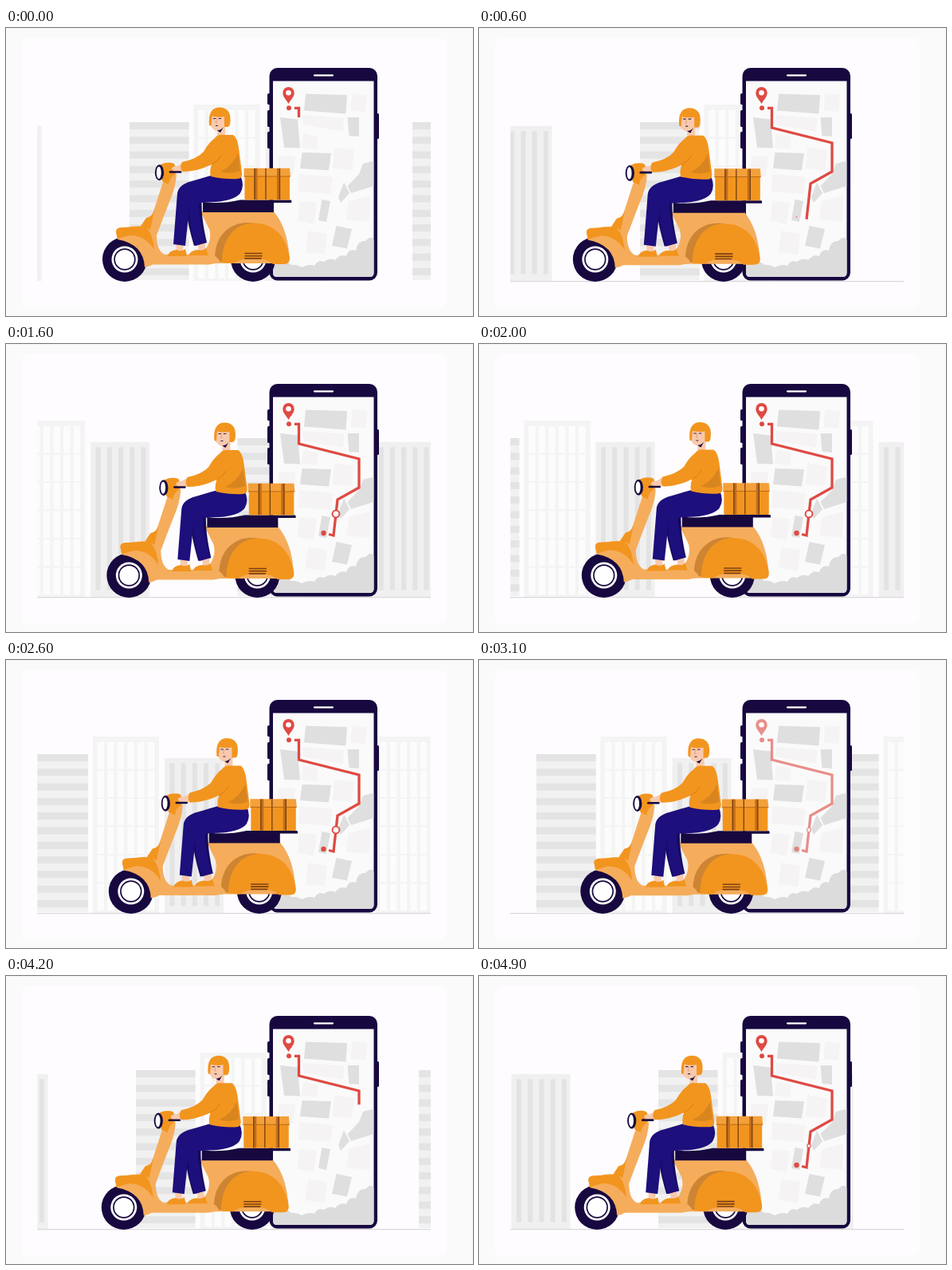
Recreate the animation shown at these times as an HTML page. Size 586 px wide and 361 px high, loop 5 s.

```html
<!DOCTYPE html>
<html lang="en">
<head>
<meta charset="utf-8">
<title>Scooter delivery</title>
<style>
html, body { margin: 0; width: 100%; height: 100%; overflow: hidden; background: #fafafa; }
svg { display: block; width: 586px; height: 361px; }
</style>
</head>
<body>
<svg viewBox="0 0 586 361">
  <defs>
    <clipPath id="street"><rect x="39.5" y="90" width="493.5" height="228"/></clipPath>
    <clipPath id="screen"><path d="M335 66.500H461.500V307Q461.500 312 456 312H340Q335 312 335 307Z"/></clipPath>
    <g id="block"></g>
  </defs>
  <rect x="20" y="12" width="533" height="340" rx="9" fill="#fefcfe"/>
  <path d="M0 .5H585.5V361" fill="none" stroke="#f2f2f3"/>

  <g clip-path="url(#street)"><g id="city"></g></g>
  <path id="ground" d="M39 317.7H533" stroke="#d2d0d4"/>

  <!-- phone -->
  <g fill="#170840">
    <rect x="328" y="82" width="5" height="14" rx="1.5"/>
    <rect x="328" y="103" width="5" height="21" rx="1.5"/>
    <rect x="328" y="130" width="5" height="21" rx="1.5"/>
    <rect x="463" y="107" width="5" height="32" rx="1.5"/>
    <rect x="330.5" y="50" width="135.5" height="266.5" rx="10"/>
  </g>
  <path d="M387 59.3H410" stroke="#fff" stroke-width="2.2" stroke-linecap="round"/>
  <g clip-path="url(#screen)">
    <rect x="334" y="66" width="128" height="247" fill="#fafafa"/>
    <path fill="#f5f3f3" d="M372 109L424 113 423 130 373 121ZM434 82L453 84 451 105 433 104ZM373 132L392 137 390 152 371 150ZM412 149L437 153 434 178 410 176ZM368 183L410 187 407 208 367 205ZM342 160L363 161 360 185 340 184ZM430 217L457 210 456 243 427 240ZM368 217L390 219 386 246 366 242ZM379 254L403 258 400 284 376 281Z"/>
    <path fill="#dfdfdf" d="M376 82.500L428 84 426.500 107.500 374 103.500ZM428.500 112H443V136L430.500 135ZM344 112L366 114.500 369 150.500 349 150ZM371.500 156L408 157 405 178.500 369 176ZM396.500 215L407 217 402 243 392 241ZM414.500 248L434 252 428 276.500 409 273ZM424 193.500L431 207 420 219 417 212ZM461.500 166.500V198L433 207 428.500 198 443 183 448 170Z"/>
    <path fill="#dcdcdc" d="M334 313V289Q342 287 346 294Q354 292 358 297Q365 296 371 300Q380 295 387 298Q391 290 399 293Q406 287 413 291Q419 283 427 286Q430 276 439 279Q441 266 451 267Q458 259 462 266V313Z"/>
  </g>

  <g id="pin">
    <path fill="#de4a43" d="M354.500 95C352 90 347.300 86.500 347.300 81.200A7.200 7.200 0 0 1 361.700 81.200C361.700 86.500 357 90 354.500 95Z"/>
    <circle cx="354.500" cy="81.200" r="3.300" fill="#fff"/>
  </g>
  <g id="trip">
    <circle id="from" cx="355" cy="100.200" r="3" fill="#de4a43"/>
    <path id="route" d="M362 100.300H367.500V125L443 144V180L416 195L411 240L405 238.500" fill="none" stroke="#de4a43" stroke-width="3.300"/>
    <circle id="to" cx="398.500" cy="237" fill="#de4a43"/>
    <circle id="ring" cx="414" cy="213" fill="#fff" stroke="#de4a43" stroke-width="2"/>
  </g>

  <g id="scooter">
    <g id="wheels"></g>

    <g id="sprung">
      <!-- rear body -->
      <path fill="#f5ad5c" d="M244 230H336Q352 249 355 281Q357 292 350 295H262L244 290V284Q260 270 255 252Z"/>
      <path fill="#cd8433" d="M262 293Q261 263 281 250Q294 242 311 244.500L278 293Z"/>
      <path fill="#f2951f" d="M271 294C271 264 287 244.500 311 244.500C337 244.500 352 262 356 288Q356.500 296 349 296H335Q329 289 311 289Q293 289 286 295Z"/>
      <path stroke="#7d4015" stroke-width="1.600" stroke-linecap="round" d="M300 282.500H321M300 285.700H321M300 288.900H320"/>

      <!-- floor, shield and front fender -->
      <path fill="#f5ad5c" d="M198 190L207 172L214 184Q213 200 205 218Q196 241 189 260Q189 279 199 284H256Q264 284 269 294L255 296.500H182Q180 272 169 252Q180 246 186 227Z"/>
      <path fill="#f2951f" d="M176 238Q183 237 186 229L181 253Q176 249 168 250Z"/>
      <path fill="#f5ad5c" d="M138 256Q140 250 152 250Q164 247 174 249Q186 260 187 292Q186 298 174 300Q173 271 140 265Z"/>
      <path fill="#f2951f" d="M138 255Q138 250 146 250Q160 249 174 248.500Q184 256 186 278Q174 259 155 260Q146 262 140 264.500Z"/>
      <path fill="#f2951f" d="M194 171Q203 167 211 170Q215 177 211 184Q205 188 204 196L196 192Z"/>
      <ellipse cx="192.500" cy="181.300" rx="5.600" ry="10" fill="#170840"/>
      <ellipse cx="191.800" cy="181.300" rx="3" ry="7.600" fill="#fff"/>

      <!-- seat, rack and box -->
      <path fill="#170840" d="M247 218Q270 221 294 215.500H357.500Q359 217 358 219H336V231H247Z"/>
      <path fill="#f2951f" d="M299.500 184H356V214Q356 215.500 354 215.500H301.500Q299.500 215.500 299.500 214Z"/>
      <path fill="#f4a03a" d="M298.500 175.700H356L357 186H298.500Z"/>
      <path stroke="#b96614" fill="none" d="M298.500 186H357"/>
      <path stroke="#c06d1c" stroke-width="4" d="M313.500 176V215M342 176V215"/>
      <path stroke="#75400f" stroke-width="1.300" d="M312 176V215M326 176V215M343.500 176V215"/>

      <!-- feet -->
      <path fill="#f8c9ad" d="M213 269H223L222 281H214ZM240 267H250V280H242Z"/>
      <path fill="#f2951f" d="M203 285Q205 279 214 278Q220 281 225 277L227 286H203ZM229 285Q231 279 241 278Q247 280 251 276L254 285Z"/>

      <!-- trousers -->
      <path fill="#150a5c" d="M226 220L246 213Q244 235 252 269L236 273Q226 240 226 220Z"/>
      <path fill="#1d0f7c" d="M257 185H294Q300 197 294 207Q287 216 263 218L242 219Q242 241 251 269L238 273Q229 248 230 226L225 273L210 271Q213 233 215 207Q217 196 233 192Z"/>

      <!-- arm, jumper and head -->
      <path fill="#f8c9ad" d="M224 168L215 173Q208 173 208 177L211 180H226Z"/>
      <path d="M206 180.500H219" stroke="#170840" stroke-width="2.600" stroke-linecap="round"/>
      <g id="torso">
        <path fill="#f8c9ad" d="M265 120H275V137H265Z"/>
        <path fill="#f2951f" d="M262 138Q266 133 273 134L285 134Q290 137 292 150L296 181Q297 189 291 189Q275 190 257 186Q255 180 258 171Q240 180 222 180Q217 177 221 168Q240 164 248 155Q254 144 262 138Z"/>
        <path fill="#d9851f" d="M269 180Q284 173 291 157L294 179Q282 184 269 180Z"/>
        <path d="M258 171Q266 167 270 160" fill="none" stroke="#d47d12"/>
        <path fill="#f8c9ad" d="M257 109H275V123Q273 130 267 129.500Q259 129 257 122Z"/>
        <path fill="#f2951f" d="M255 122Q253 100.500 267 99.500Q281 99.500 281.500 113Q282 124 278 124H274V111Q265 112.500 258.500 110.500L257.500 123Z"/>
        <path fill="none" stroke="#3a2440" stroke-width="1.100" d="M260 113.500H263.500M266.500 113.500H270M263 122.500H266"/>
        <path fill="none" stroke="#d99878" stroke-width=".8" d="M264.500 114L263 118.500H265"/>
        <path fill="#170840" d="M265 128.500Q270 128 273 124L269 131Z"/>
      </g>
    </g>
  </g>
</svg>
<script>
const $ = id => document.getElementById(id);
const LOOP = 5000, PERIOD = 355;
const rect = (x, y, w, h, fill) =>
  `<rect x="${x}" y="${y}" width="${w}" height="${h}" fill="${fill}"/>`;

// One group of three buildings, with the left edge at 0
let art = rect(0, 118, 74.5, 198, '#f1f1f1');
for (let i = 0; i < 11; i++) art += rect(0, 118 + i * 18.3, 74.5, 9, '#e4e4e4');
art += rect(80.5, 96, 83, 221, '#f4f4f4');
for (let c = 0; c < 6; c++)
  for (let r = 0; r < 6; r++) art += rect(86 + c * 12.6, 103 + r * 35.5, 8.5, 33.5, '#fcfcfc');
art += rect(170.5, 123, 74, 194, '#f0f0f0');
for (let i = 0; i < 5; i++) art += rect(177 + i * 14.2, 129.5, 6, 179, '#e3e3e3');
$('block').innerHTML = art;
$('city').innerHTML = [-1, 0, 1].map(i => `<use href="#block" x="${i * PERIOD}"/>`).join('');

$('wheels').innerHTML = [149, 310].map(x =>
  [[28, '#170840'], [16.5, '#fff'], [13.7, '#170840'], [12, '#fff']].map(([r, fill]) =>
    `<circle cx="${x}" cy="290" r="${r}" fill="${fill}"/>`).join('')).join('');

const clamp = v => Math.min(1, Math.max(0, v));
const ramp = (t, a, b) => clamp((t - a) / (b - a));
const move = (id, x, y) => $(id).setAttribute('transform', `translate(${x} ${y})`);

// Linear interpolation through [position, value] pairs
function track(keys, t) {
  let i = 1;
  while (i < keys.length - 1 && t > keys[i][0]) i++;
  const [a, va] = keys[i - 1], [b, vb] = keys[i];
  return va + (vb - va) * ramp(t, a, b);
}

const scroll = [[0, 0], [600, 47], [1100, 85], [2000, 176], [3100, 272], [4200, 363], [4900, 425], [5000, 434]];
const sway = [[0, 0], [8, -1.2], [30, -2.9], [47, -3.2], [70, -.8], [85, 1], [130, 5],
  [176, 7.8], [220, 8.1], [272, 6.3], [315, 3.2], [355, 0]];
const route = $('route'), total = route.getTotalLength();

function draw(now) {
  const t = now % LOOP;
  const u = track(scroll, t);
  const x = track(sway, u % PERIOD);
  move('city', (155 + u) % PERIOD, 0);
  move('scooter', x, 0);
  move('sprung', 0, -.2 * x);
  move('torso', .2 * x, 0);
  $('ground').setAttribute('visibility', t < 100 ? 'hidden' : 'visible');

  // The trip is drawn, held and faded, then starts again
  const again = t >= 3500;
  const s = again ? t - 3880 : t;
  const fade = again ? 1 : 1 - ramp(t, 2980, 3290);
  const len = total * ramp(s, -50, 620);
  route.setAttribute('stroke-dasharray', `${len} 999`);
  route.setAttribute('visibility', len > 0 ? 'visible' : 'hidden');
  $('trip').setAttribute('opacity', fade);
  $('from').setAttribute('r', 3 * ramp(s, -180, -20));
  $('to').setAttribute('r', 3.2 * ramp(s, 560, 720));
  const ring = ramp(s, 950, 1090) * (again ? 1 : 1 - ramp(t, 2950, 3290));
  $('ring').setAttribute('r', 4.4 * ring);
  $('ring').setAttribute('stroke-width', 2 * ring);
  $('pin').setAttribute('opacity', again ? ramp(t, 3500, 3750) : fade);
}

function frame() {
  draw(performance.now());
  requestAnimationFrame(frame);
}
frame();
</script>
</body>
</html>
```
